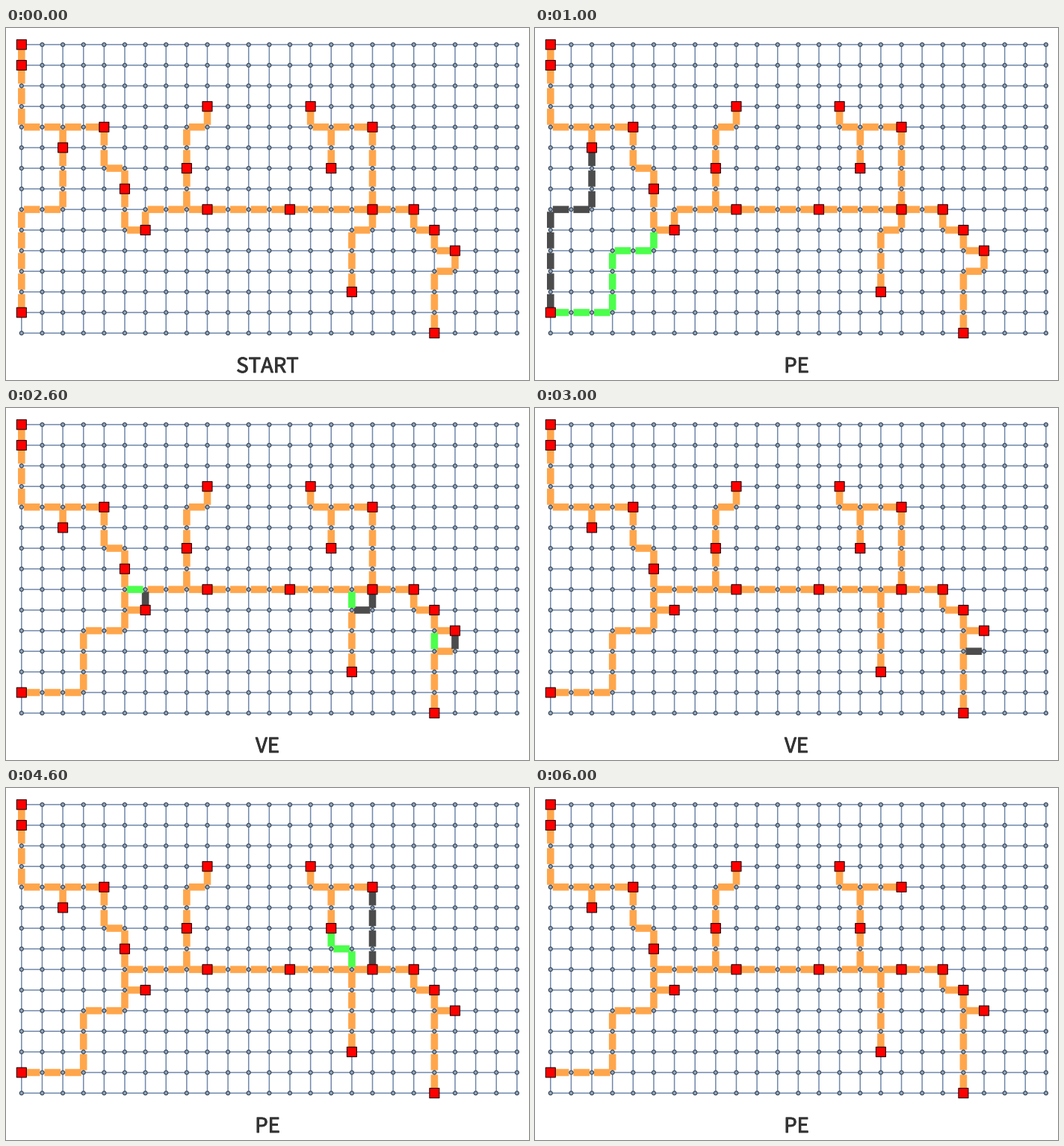
Recreate the animation shown at these times as a matplotlib script. Size 700x472 px, loop 7 s.

```python
import matplotlib.pyplot as plt
from matplotlib.animation import FuncAnimation
from matplotlib.collections import LineCollection, PatchCollection
from matplotlib.patches import Circle, Rectangle
from matplotlib.patheffects import withStroke

W, H, DPI = 700, 472, 100
PX = 72 / DPI                      # points per pixel
COLS, ROWS = 25, 15
X0, Y0, STEP = 20.8, 22.3, 27.63
GAP = 3                            # bar ends stop short of the nodes
SIDE = 13                          # terminal square

ORANGE, GREEN, DARK, INK = "#ffa64c", "#4cff4c", "#4c4c4c", "#333333"

# Key points of the first tree; a routing rule fills in the edges.
CHAINS = [
    [(21, 10), (20, 9), (19, 8), (13, 8), (9, 8), (6, 9), (5, 9), (5, 7),
     (4, 4), (0, 4), (0, 1), (0, 0)],
    [(21, 10), (20, 14)],
    [(2, 4), (2, 5), (0, 13)],
    [(9, 3), (8, 6), (8, 8)],
    [(16, 12), (16, 9), (17, 8), (17, 4), (14, 3)],
    [(15, 4), (15, 6)],
]
JOINTS = {(0, 4), (5, 9), (2, 4), (8, 8), (16, 9), (15, 4)}
TERMINALS = {p for chain in CHAINS for p in chain} - JOINTS

# (label, added chains, removed chains)
STEPS = [
    ("START", [], []),
    ("PE", [[(5, 9), (3, 13), (0, 13)]], [[(2, 5), (0, 13)]]),
    ("VE", [[(5, 8), (6, 8)], [(16, 8), (16, 9)], [(20, 10), (20, 11)]],
     [[(6, 8), (6, 9)], [(16, 9), (17, 8)], [(21, 10), (21, 11)]]),
    ("VE", [], [[(20, 11), (21, 11)]]),
    ("PE", [[(15, 6), (16, 8)]], [[(17, 8), (17, 4)]]),
    ("VE", [[(15, 7), (15, 8)]], [[(15, 7), (16, 8)]]),
    ("PE", [], []),
]


def pos(node):
    return X0 + STEP * node[0], Y0 + STEP * node[1]


def walk(p, q):
    """Unit edges of a straight run."""
    steps = max(abs(q[0] - p[0]), abs(q[1] - p[1]))
    nodes = [(p[0] + (q[0] - p[0]) * i // steps,
              p[1] + (q[1] - p[1]) * i // steps) for i in range(steps + 1)] \
        if steps else [p]
    return {tuple(sorted(e)) for e in zip(nodes, nodes[1:])}


def route(p, q):
    """Go a third of the height, step sideways, then finish the height."""
    bend = p[1] + round((q[1] - p[1]) / 3)
    a, b = (p[0], bend), (q[0], bend)
    return walk(p, a) | walk(a, b) | walk(b, q)


def edges(chains):
    return {e for chain in chains
            for p, q in zip(chain, chain[1:]) for e in route(p, q)}


def bar(edge):
    (x1, y1), (x2, y2) = map(pos, edge)
    gx, gy = (GAP, 0) if y1 == y2 else (0, GAP)
    return [(x1 + gx, y1 + gy), (x2 - gx, y2 - gy)]


def build_states():
    """For every step: label, bars and their colours."""
    tree, states = edges(CHAINS), []
    for label, add, cut in STEPS:
        new, old = edges(add), edges(cut)
        layers = [(tree - old, ORANGE), (old, DARK), (new, GREEN)]
        bars = [bar(e) for group, _ in layers for e in sorted(group)]
        colors = [c for group, c in layers for _ in group]
        states.append((label, bars, colors))
        tree = (tree - old) | new
    return states


def add_shapes(shapes, **style):
    ax.add_collection(PatchCollection(shapes, snap=False, **style))


states = build_states()

fig = plt.figure(figsize=(W / DPI, H / DPI), dpi=DPI, facecolor="white")
ax = fig.add_axes([0, 0, 1, 1])
ax.set_xlim(0, W)
ax.set_ylim(H, 0)
ax.axis("off")

grid = [[pos((c, 0)), pos((c, ROWS - 1))] for c in range(COLS)]
grid += [[pos((0, r)), pos((COLS - 1, r))] for r in range(ROWS)]
ax.add_collection(LineCollection(grid, colors="#7088ac", linewidths=1.5 * PX,
                                 snap=False, zorder=1))

tree_bars = LineCollection([], linewidths=9.6 * PX, capstyle="butt",
                           snap=False, zorder=2)
ax.add_collection(tree_bars)

add_shapes([Circle(pos((c, r)), 2.5) for c in range(COLS)
            for r in range(ROWS)],
           facecolor="#93a5b8", edgecolor="#3c4a5c", linewidth=1.2 * PX,
           zorder=3)
add_shapes([Rectangle((x - SIDE / 2, y - SIDE / 2), SIDE, SIDE)
            for x, y in map(pos, sorted(TERMINALS))],
           facecolor="#ff0000", edgecolor="#200000", linewidth=1.1 * PX,
           zorder=4)

caption = ax.text(350, 462, "", ha="center", va="baseline", color=INK,
                  family="Noto Sans CJK JP", size=27.5 * PX, zorder=5)
caption.set_path_effects([withStroke(linewidth=0.9 * PX, foreground=INK)])


def draw(i):
    label, bars, colors = states[i]
    tree_bars.set_segments(bars)
    tree_bars.set_color(colors)
    caption.set_text(label)
    return tree_bars, caption


anim = FuncAnimation(fig, draw, frames=len(states), interval=1000,
                     repeat=True, repeat_delay=0)
plt.show()
```
